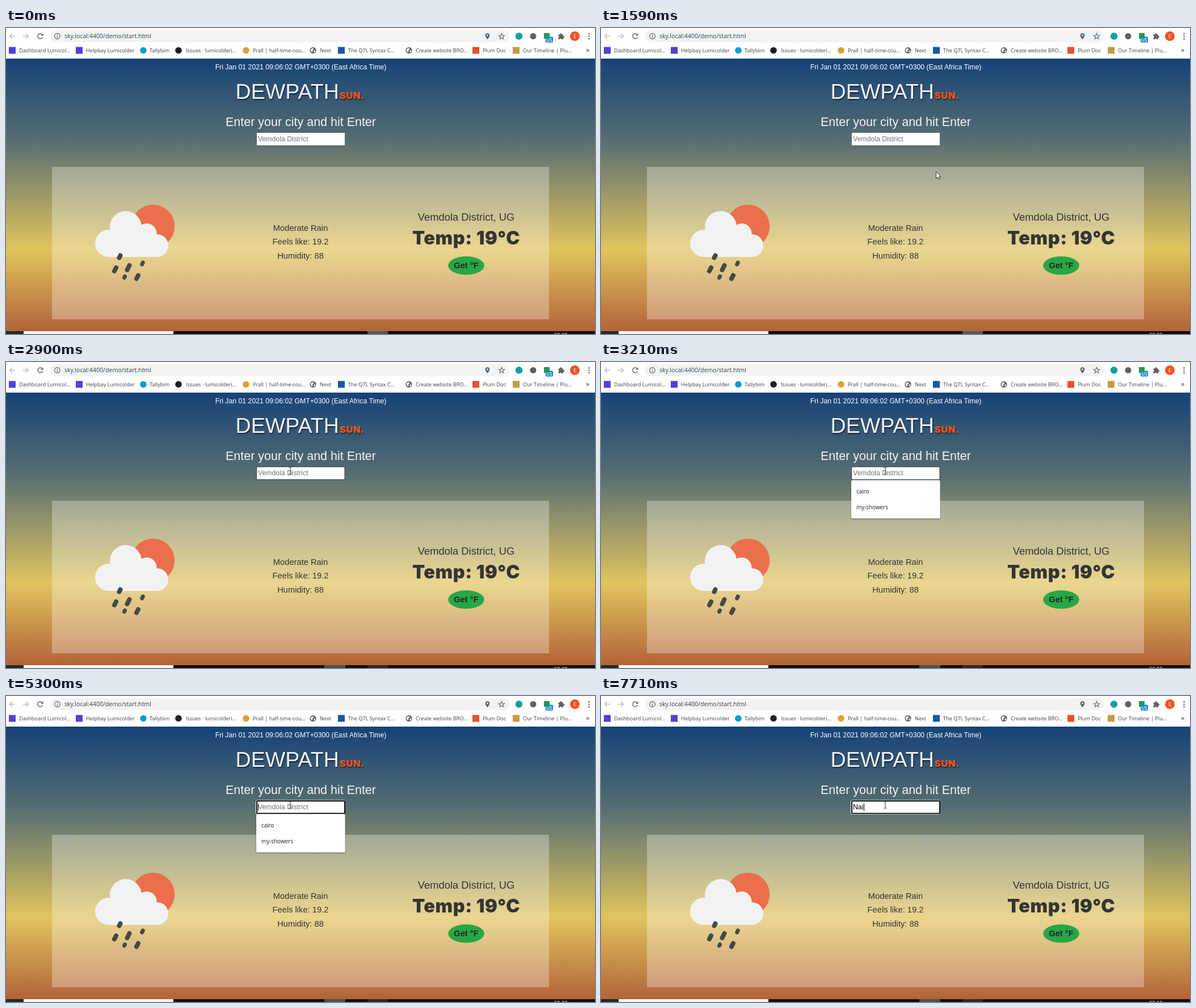
An HTML page that plays this animation: 1038 px wide and 540 px high, repeating every 8 s.

```html
<!DOCTYPE html>
<html lang="en">
<head>
<meta charset="utf-8">
<title>Weather page</title>
<style>
  html, body { margin: 0; width: 100%; height: 100%; overflow: hidden; background: #fff; }
  svg { display: block; width: 1038px; height: 540px; }
  text { font-family: "Liberation Sans", Arial, sans-serif; white-space: pre; }
  .ui { font-family: "Open Sans", "Noto Sans", sans-serif; font-size: 9.2px; fill: #3c4043; }
  .url { font-size: 10.6px; }
  .option { font-size: 9.9px; fill: #202124; }
  .mid { text-anchor: middle; }
  .black { font-family: Inter, sans-serif; font-weight: 900; letter-spacing: .5px; }
  .body { font-size: 14.7px; fill: #343434; }
  .field { font-size: 12.27px; }
  .shade { text-shadow: 1px 2px 2px rgba(0, 0, 0, .55); }
  .line { fill: none; stroke: #5f6368; stroke-width: 1.4; }
</style>
</head>
<body>
<svg viewBox="0 0 1038 540">
  <defs>
    <linearGradient id="sky" x2="0" y2="1">
      <stop offset="0" stop-color="#154277"/>
      <stop offset=".3" stop-color="#576e71"/>
      <stop offset=".7" stop-color="#e1c45e"/>
      <stop offset="1" stop-color="#b26339"/>
    </linearGradient>
    <filter id="soft"><feGaussianBlur stdDeviation=".7"/></filter>
    <filter id="drop" x="-10%" y="-10%" width="120%" height="130%">
      <feDropShadow dx="0" dy="1" stdDeviation="1" flood-opacity=".4"/>
    </filter>
    <g id="globe">
      <circle r="5.6" fill="#5f6368"/>
      <path d="M-4.2-1.5Q-2-4 .5-3.7L1.5-1.5-1 0-.5 2-2 3.6Q-4.4 1.5-4.2-1.5ZM2 0 4.5 .5Q4 3 1.5 4.2Z" fill="#fff"/>
    </g>
  </defs>

  <rect width="1038" height="54" fill="#fff"/>
  <rect x="78" y="4" width="809" height="21" rx="10.5" fill="#f1f3f4"/>
  <g class="line">
    <g stroke="#babcbe">
      <path d="M16 14.5H6.5M11 10 6.5 14.5 11 19"/>
      <path d="M30 14.5H39.5M35 10 39.5 14.5 35 19"/>
    </g>
    <path d="M63.7 11.5A4.5 4.5 0 1 0 64.5 16"/>
    <path d="M65.5 9.5V13.8H61.2Z" fill="#5f6368" stroke="none"/>
    <circle cx="90.5" cy="14.5" r="4.9" stroke-width="1.1"/>
    <path d="M90.5 13.7V17.5M90.5 11.5V12.7" stroke-width="1.2"/>
    <path id="star" stroke-width="1.1"/>
  </g>
  <g fill="#5f6368">
    <path d="M848.5 20Q844.7 15.5 844.7 13A3.8 3.8 0 0 1 852.3 13Q852.3 15.5 848.5 20ZM848.5 11.6A1.4 1.4 0 1 0 848.5 14.4 1.4 1.4 0 0 0 848.5 11.6Z"/>
    <path d="M973.5 11.5H976.3A1.7 1.7 0 1 1 979.5 11.5H982V14A1.7 1.7 0 1 1 982 17.3V20H979.3A1.6 1.6 0 0 0 976.2 20H973.5V17.2A1.6 1.6 0 0 0 973.5 14.2Z"/>
    <circle cx="929" cy="14.5" r="5.5"/>
    <circle cx="1027.5" cy="10.5" r="1.3"/>
    <circle cx="1027.5" cy="14.8" r="1.3"/>
    <circle cx="1027.5" cy="19.1" r="1.3"/>
  </g>
  <circle cx="904" cy="14.5" r="6.2" fill="#159fa4"/>
  <rect x="948" y="9" width="10" height="10" fill="#249b48"/>
  <rect x="951" y="15.5" width="13" height="10" rx="1.5" fill="#1686bd"/>
  <text class="ui mid" x="957.5" y="23.5" style="font-size:8px;font-weight:600;fill:#fff">US</text>
  <circle cx="1002.5" cy="14.5" r="8.5" fill="#f4511e"/>
  <text class="ui mid" x="1002.5" y="18" style="fill:#fff">E</text>
  <text class="ui url" x="103" y="18.3">sky.local:4400/demo/start.html</text>
  <g id="bookmarks"></g>
  <text class="ui" x="1022" y="43" style="font-size:13px">»</text>

  <rect y="54" width="1038" height="481" fill="url(#sky)"/>
  <rect x="81" y="245" width="876" height="269" fill="#fff" fill-opacity=".3"/>
  <g fill="#fff">
    <text class="mid field" x="519.5" y="73">Fri Jan 01 2021 09:06:02 GMT+0300 (East Africa Time)</text>
    <text class="shade" x="404.5" y="125" font-size="37.6" fill="#f4f4f4">DEWPATH</text>
    <text class="black shade" x="588" y="125.3" font-size="16.5" style="fill:#f4511e">SUN.</text>
    <text class="mid" x="519.5" y="173" font-size="21.48" fill="#f4f4f4">Enter your city and hit Enter</text>
  </g>

  <g filter="url(#soft)">
    <circle cx="259" cy="350" r="38.3" fill="#eb6f4c"/>
    <g fill="#f2f2f4">
      <circle cx="181" cy="380" r="24"/>
      <circle cx="211" cy="351" r="28"/>
      <circle cx="248" cy="362.5" r="17.5"/>
      <circle cx="266" cy="384" r="20"/>
      <rect x="181" y="370" width="85" height="34"/>
    </g>
    <g id="rain" stroke="#434a48" stroke-linecap="round"></g>
  </g>
  <g class="mid body">
    <text x="519" y="357.5">Moderate Rain</text>
    <text x="519" y="382">Feels like: 19.2</text>
    <text x="519" y="406.5">Humidity: 88</text>
    <text x="811" y="340" font-size="18.4">Vemdola District, UG</text>
    <text class="black" x="811" y="381.5" font-size="32.5">Temp: 19°C</text>
    <ellipse cx="811" cy="419.3" rx="31.8" ry="16.2" fill="#28a745"/>
    <text x="811" y="424.3" font-weight="bold" fill="#212529">Get °F</text>
  </g>

  <rect x="442" y="185" width="155" height="22" fill="#fff"/>
  <rect id="border" x="441.5" y="185" width="155.5" height="22.5" fill="none" stroke="#333b42"/>
  <g id="ring" fill="none">
    <rect x="440.5" y="184" width="157" height="24.5" rx="2" stroke="#fff"/>
    <rect x="442" y="185.3" width="155" height="22" rx="1" stroke="#101010" stroke-width="2"/>
  </g>
  <text id="hint" class="field" x="444" y="200" fill="#757575">Vemdola District</text>
  <g id="typed" class="field" fill="#000"></g>
  <rect id="caret" x="444" y="190" width="1" height="13"/>
  <g id="menu">
    <rect x="441" y="208.5" width="156.5" height="67.5" rx="2.5" fill="#fff" filter="url(#drop)"/>
    <text class="ui option" x="450" y="232.3">cairo</text>
    <text class="ui option" x="450" y="260.3">my-showers</text>
  </g>

  <rect y="535" width="1038" height="5" fill="#100f10"/>
  <rect y="535" width="31" height="5" fill="#1d2b29"/>
  <rect x="31" y="535" width="264" height="5" fill="#f7f8f8"/>
  <rect id="taskA" x="561" y="535" width="37" height="5" fill="#4b5350"/>
  <rect x="637" y="535" width="36" height="5" fill="#2b2a28"/>
  <rect id="taskB" x="637" y="535" width="36" height="5" fill="#515b57"/>
  <text id="clockA" class="ui" x="966" y="545" style="fill:#fff">09:09</text>
  <text id="clockB" class="ui" x="966" y="545" style="fill:#fff">09:10</text>

  <g id="pointer">
    <path id="arrow" d="M.5 .5V12.5L3.3 10 5.2 14.3 7.2 13.4 5.3 9.3H9Z" fill="#fff" stroke="#222" stroke-width=".9"/>
    <path id="beam" d="M-2.5-6H-.5L0-5.5.5-6H2.5M0-5.5V5.5M-2.5 6H-.5L0 5.5.5 6H2.5" fill="none" stroke="#333"/>
  </g>
</svg>
<script>
const LOOP = 8000;
const $ = id => document.getElementById(id);

function add(parent, tag, attrs, text = '') {
  const el = document.createElementNS('http://www.w3.org/2000/svg', tag);
  for (const key in attrs) el.setAttribute(key, attrs[key]);
  el.textContent = text;
  return parent.appendChild(el);
}

const starPoints = Array.from({ length: 10 }, (_, i) => {
  const r = i % 2 ? 2.3 : 5.4, a = i * Math.PI / 5;
  return `${873.5 + r * Math.sin(a)} ${14.8 - r * Math.cos(a)}`;
});
$('star').setAttribute('d', `M${starPoints.join('L')}Z`);

// icon centre, icon shape, colour, text start, label
[
  [11, 'square', '#5140d6', 23, 'Dashboard Lumicol...'],
  [129, 'square', '#5140d6', 141, 'Helpbay Lumicolder'],
  [242, 'circle', '#0c9bd8', 253, 'Tallybim'],
  [304, 'circle', '#1b1f23', 317, 'Issues · lumicolderi...'],
  [423, 'circle', '#e0a030', 435, 'Prall | half-time-cou...'],
  [541, 'globe', '', 553, 'Next'],
  [591, 'square', '#1757a6', 603, 'The Q7L Syntax C...'],
  [710, 'globe', '', 722, 'Create website BRO...'],
  [828, 'square', '#e8502a', 840, 'Plum Doc'],
  [899, 'square', '#c79a45', 911, 'Our Timeline | Plu...']
].forEach(([x, shape, fill, textX, label]) => {
  const row = $('bookmarks');
  if (shape === 'globe') add(row, 'use', { href: '#globe', x, y: 39.5 });
  else if (shape === 'circle') add(row, 'circle', { cx: x, cy: 39.5, r: 5.8, fill });
  else add(row, 'rect', { x: x - 6, y: 33.5, width: 12, height: 12, fill });
  add(row, 'text', { class: 'ui', x: textX, y: 42.6 }, label);
});

// x, y, half length, width
[[200.5, 403.5, 2, 8], [192.5, 426, 3, 8], [215.5, 423, 4, 8],
 [240.5, 415.5, 1.5, 7], [209, 439.5, 1, 7], [231.5, 439.5, 3, 8]
].forEach(([x, y, h, w]) => add($('rain'), 'path', {
  d: `M${x + h * .5} ${y - h}L${x - h * .5} ${y + h}`, 'stroke-width': w
}));

// Holds each value until the next listed time.
function play(el, prop, steps) {
  const frames = steps.map(([time, value]) =>
    ({ offset: time / LOOP, [prop]: value, easing: 'step-end' }));
  frames.push({ offset: 1, [prop]: steps[steps.length - 1][1] });
  el.animate(frames, { duration: LOOP, iterations: Infinity });
}

// Each listed time flips visibility, beginning with a show.
function toggle(el, ...times) {
  const steps = times.map((t, i) => [t, 1 - i % 2]);
  if (times[0] > 0) steps.unshift([0, 0]);
  play(el, 'opacity', steps);
}

[['N', 7440, 7560], ['Na', 7560, 7710], ['Nai', 7710]].forEach(([word, ...times]) =>
  toggle(add($('typed'), 'text', { x: 444, y: 200 }, word), ...times));

toggle($('hint'), 0, 7440);
toggle($('menu'), 3210, 7440);
toggle($('border'), 2150, 3290);
toggle($('ring'), 3290);
toggle($('caret'), 3290, 3740, 4200, 4750, 5300, 5850, 6320, 6870, 7440);
toggle($('taskA'), 2750);
toggle($('taskB'), 0, 2750);
toggle($('clockA'), 0, 6170);
toggle($('clockB'), 6170);
toggle($('arrow'), 70, 2150);
toggle($('beam'), 2150);

play($('caret'), 'transform', [
  [0, 0], [7440, 9], [7560, 16], [7710, 19]
].map(([t, x]) => [t, `translateX(${x}px)`]));

play($('pointer'), 'transform', [
  [0, 866, 396], [140, 859, 387], [210, 854, 381],
  [510, 832, 364], [570, 800, 342], [640, 775, 327],
  [870, 752, 321], [950, 722, 313], [1040, 701, 308],
  [1290, 667, 291], [1360, 626, 272], [1430, 598, 258],
  [1590, 590, 253], [1670, 561, 236], [1740, 540, 224],
  [1970, 526, 213], [2060, 514, 208], [2150, 507, 198],
  [2250, 503, 194], [2340, 501, 193], [2520, 501, 192]
].map(([t, x, y]) => [t, `translate(${x}px, ${y}px)`]));
</script>
</body>
</html>
```
